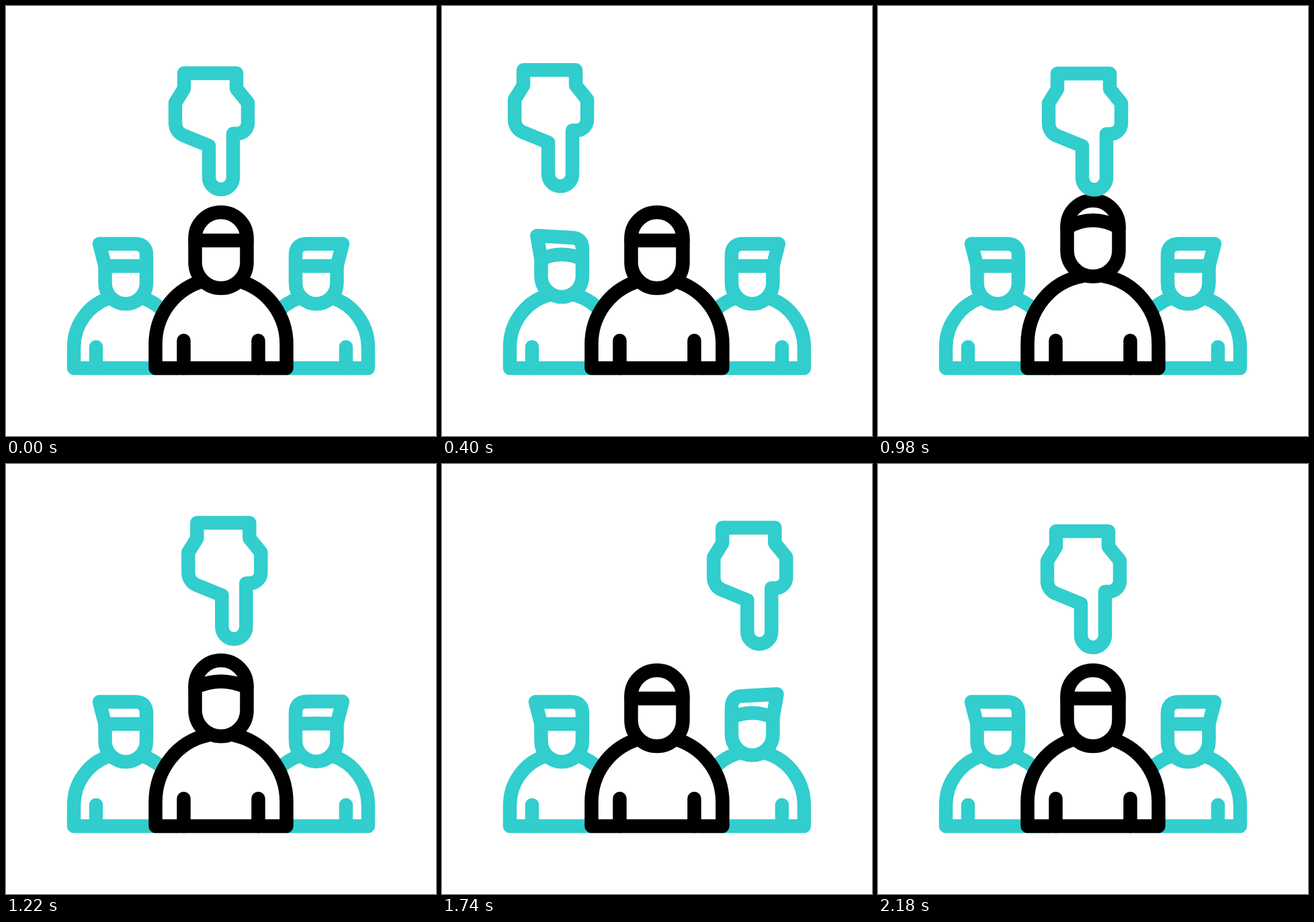
Write an HTML page with a canvas that moves like this. It is 640 by 640 pixels and loops after 2.4 s.

```html
<!DOCTYPE html>
<html lang="en">
<head>
<meta charset="utf-8">
<title>Choosing a person</title>
<style>
  html, body { margin: 0; width: 100%; height: 100%; overflow: hidden; background: #fff; }
  canvas { display: block; width: 100vw; height: 100vh; }
</style>
</head>
<body>
<canvas id="stage" width="640" height="640"></canvas>
<script>
const ctx = document.getElementById('stage').getContext('2d');
const LOOP = 2400;
const TEAL = '#32cdcd';
const BLACK = '#000';
const FLOOR = 539;

// Stops of the hand: time, offset x, offset y, height of the arc leading there
const STOPS = [
  [0, 0, 0, 0],
  [500, -148.5, 0, 26],
  [1045, 3, 2, 27],
  [1635, 157, 0, 31],
  [2180, 0, 0, 29.5]
];

const clamp = v => Math.min(1, Math.max(0, v));
const lerp = (a, b, p) => a + (b - a) * p;
const ease = p => p < 0.5 ? 4 * p ** 3 : 1 - 4 * (1 - p) ** 3;
const ramp = (t, a, b) => ease(clamp((t - a) / (b - a)));
const pulse = (t, a, b, c, d) => ramp(t, a, b) - ramp(t, c, d);

function handOffset(t) {
  const i = STOPS.findIndex(s => s[0] > t);
  if (i < 0) return [0, 0];
  const [t0, x0, y0] = STOPS[i - 1];
  const [t1, x1, y1, height] = STOPS[i];
  const p = ramp(t, t0, t1);
  const arc = Math.pow(4 * p * (1 - p), 0.8);
  return [lerp(x0, x1, p), lerp(y0, y1, p) - height * arc];
}

function paint(color, fill) {
  if (fill) {
    ctx.fillStyle = '#fff';
    ctx.fill();
  }
  ctx.strokeStyle = color;
  ctx.stroke();
}

function line(x0, y0, x1, y1, color) {
  ctx.beginPath();
  ctx.moveTo(x0, y0);
  ctx.lineTo(x1, y1);
  paint(color);
}

function body(cx, cy, rx, ry, neck, color) {
  const a = Math.asin(neck / rx);
  ctx.beginPath();
  ctx.ellipse(cx, cy, rx, ry, 0, -Math.PI / 2 - a, -Math.PI, true);
  ctx.lineTo(cx - rx, FLOOR);
  ctx.lineTo(cx + rx, FLOOR);
  ctx.lineTo(cx + rx, cy);
  ctx.ellipse(cx, cy, rx, ry, 0, 0, -Math.PI / 2 + a, true);
  paint(color, true);
}

function brow(x0, x1, y, bend, color) {
  ctx.beginPath();
  ctx.moveTo(x0, y);
  ctx.quadraticCurveTo((x0 + x1) / 2, y - bend, x1, y);
  paint(color);
}

// Left neighbour; k is how far the head is stretched upwards
function neighbour(k) {
  const up = 10.5 * k;
  const top = 354 - 9.5 * k;
  body(178.5, 508, 77.5, 77.5 + 3 * k, 25 - 12 * k, TEAL);
  line(134, 507.5, 134, FLOOR, TEAL);
  ctx.beginPath();
  ctx.moveTo(139 + 2.5 * k, 354 - 12.5 * k);
  ctx.lineTo(192, top);
  ctx.quadraticCurveTo(209, top, 209, top + 17);
  ctx.lineTo(209, 412.5 - up);
  ctx.arc(178.25, 412.5 - up, 30.75, 0, Math.PI);
  ctx.lineTo(147.5, 387 - up);
  ctx.closePath();
  paint(TEAL, true);
  brow(147.5, 209, 387 - up, 14.5 * k, TEAL);
}

function leader(k) {
  const up = 18 * k;
  body(320, 503, 97.5, 97.5 + 5 * k, 33 - 17 * k, BLACK);
  line(264.5, 498, 264.5, FLOOR, BLACK);
  line(375.5, 498, 375.5, FLOOR, BLACK);
  ctx.beginPath();
  ctx.arc(320, 345.5 - up, 38.5, Math.PI, 0);
  ctx.arc(320, 381.5 - up, 38.5, 0, Math.PI);
  ctx.closePath();
  paint(BLACK, true);
  brow(281.5, 358.5, 349 - 20 * k, 22 * k, BLACK);
}

const HAND = new Path2D(
  'M265 100V123L252 144V174C252 182 256.500 189.500 264 192.500L302 208V255' +
  'A18 18 0 0 0 338 255V190H344A16 16 0 0 0 360 174V144L343 123V100Z'
);

function draw(t) {
  ctx.fillStyle = '#fff';
  ctx.fillRect(0, 0, 640, 640);
  ctx.lineWidth = 20.5;
  ctx.lineCap = ctx.lineJoin = 'round';

  neighbour(pulse(t, 0, 500, 500, 880));
  ctx.save();
  ctx.translate(640, 0);
  ctx.scale(-1, 1);
  neighbour(pulse(t, 1107, 1635, 1635, 2040));
  ctx.restore();
  leader(pulse(t, 500, 1100, 1100, 1440));

  ctx.save();
  ctx.translate(...handOffset(t));
  ctx.strokeStyle = TEAL;
  ctx.stroke(HAND);
  ctx.restore();
}

const start = performance.now();
function tick() {
  draw((performance.now() - start) % LOOP);
  requestAnimationFrame(tick);
}
tick();
</script>
</body>
</html>
```
